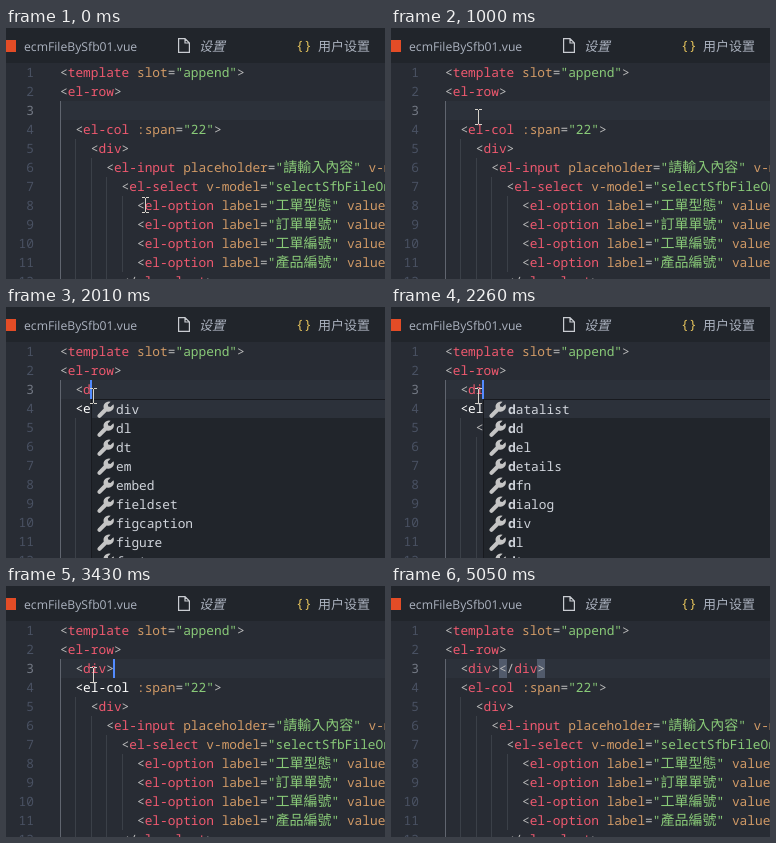
An HTML page that plays this animation: 379x251 px, repeating every 5370 ms.

```html
<!DOCTYPE html>
<html lang="zh-Hant">
<head>
<meta charset="utf-8">
<title>Tag completion in a code editor</title>
<style>
  html, body { margin: 0; width: 100%; height: 100%; overflow: hidden; background: #282c34; }
  svg { display: block; }
  text { white-space: pre; text-rendering: geometricPrecision; }
  .code { font: 12.83px "Noto Sans Mono", "DejaVu Sans Mono", monospace; }
  .cjk { font: 300 14px "Noto Sans CJK TC", "Noto Sans CJK", sans-serif; }
  .tab { font: 12.2px "Open Sans", "Noto Sans", sans-serif; fill: #abb2bf; }
  .tab.han { font: 13px "Noto Sans CJK SC", "Noto Sans CJK", sans-serif; }
  .tab.italic { font-style: italic; }
  .brace { fill: #e5c35c; }
  .hit { font-weight: 700; }
</style>
</head>
<body>
<svg id="stage" width="379" height="251" viewBox="0 0 379 251">
  <rect width="379" height="251" fill="#282c34"/>
  <rect width="379" height="35" fill="#21252b"/>
  <rect x="-2" y="12" width="12" height="12" fill="#e34c26"/>
  <text class="tab" x="18" y="23">ecmFileBySfb01.vue</text>
  <path d="M172.6 10.6h6.4l4.4 4.4v9.4h-10.8zM179 10.6v4.4h4.4" fill="none" stroke="#c9ccd1" stroke-width="1.2"/>
  <text class="tab han italic" x="193" y="23" lang="zh-Hans">设置</text>
  <text class="code brace" x="290" y="22">{</text>
  <text class="code brace" x="298" y="22">}</text>
  <text class="tab han" x="312" y="23" lang="zh-Hans">用户设置</text>

  <rect x="54" y="73" width="325" height="19" fill="#2c313a"/>
  <g id="page"></g>
  <g id="live"></g>
  <path id="mouse" d="M0 .5h3m1 0h3M3.5 1v14M0 15.5h3m1 0h3" fill="none" stroke="#d7d3cb"/>
</svg>
<script>
const LOOP = 5370, LEFT = 54, TOP = 35, ROW = 19, CH = 7.697, BASE = 14, NUMBER_END = 28;
const COLOR = { plain: '#bbbbbb', tag: '#ef596f', attr: '#d19a66', string: '#89ca78' };
const WRENCH = 'M15.2 3L12.5 5.6 10.4 5.2 10 3.3 12.6.7A5 5 0 0 0 6.3 7L.9 12.4A1.9 1.9 0 0 0 3.6 15.1L9 9.7A5 5 0 0 0 15.2 3Z';

// indent, source; rows 3 and 4 are drawn live
const LINES = [
  [0, '<template slot="append">'],
  [0, '<el-row>'],
  null,
  null,
  [4, '<div>'],
  [6, '<el-input placeholder="請輸入內容" v-model'],
  [8, '<el-select v-model="selectSfbFileOn'],
  ...['工單型態', '訂單單號', '工單編號', '產品編號'].map(s => [10, `<el-option label="${s}" value=`]),
  [8, '</el-select>']
];

const ALL = 'div dl dt em embed fieldset figcaption figure footer'.split(' ');
const WITH_D = 'datalist dd del details dfn dialog div dl dt'.split(' ');
const WITH_DI = 'dialog div datalist details'.split(' ');

const STEPS = [
  [0, { src: '', caret: 0, list: [], hit: '', match: [], broken: 0 }],
  [550, { caret: 1 }],
  [1000, { caret: 0 }],
  [1550, { src: '<', caret: 1 }],
  [1630, { match: [0] }],
  [1710, { list: ALL }],
  [2010, { src: '<d', match: [], broken: 1 }],
  [2090, { list: WITH_D, hit: 'd' }],
  [2260, { src: '<di' }],
  [2320, { list: WITH_DI, hit: 'di' }],
  [2550, { src: '<div', list: ['div'], hit: 'div' }],
  [3030, { caret: 0 }],
  [3430, { src: '<div>', caret: 1, list: [] }],
  [3510, { src: '<div></div>', broken: 0 }],
  [3580, { match: [5, 10] }],
  [4030, { caret: 0 }],
  [4510, { caret: 1 }],
  [5050, { caret: 0 }]
];

// time, centre x, centre y of the pointer
const POINTER = [
  [0, 139, 177], [70, 132, 168], [150, 112, 143], [230, 88, 116], [310, 70, 98],
  [390, 65, 90], [470, 76, 88], [550, 87, 89],
  [4350, 93, 94], [4430, 125, 116], [4510, 182, 163], [4590, 236, 207], [4670, 270, 235],
  [4730, 400, 300]
];

const $ = id => document.getElementById(id);
const page = $('page'), live = $('live'), mouse = $('mouse');

function add(parent, name, attrs, text) {
  const node = document.createElementNS('http://www.w3.org/2000/svg', name);
  for (const key in attrs) node.setAttribute(key, attrs[key]);
  if (text) node.textContent = text;
  return parent.appendChild(node);
}

const box = (parent, x, y, width, height, fill) => add(parent, 'rect', { x, y, width, height, fill });
const isHan = c => c > '\u2e80';
const widthOf = s => [...s].reduce((w, c) => w + (isHan(c) ? 14 : CH), 0);
const rowTop = n => TOP + ROW * (n - 1);

function write(parent, x, y, text, fill) {
  for (const run of text.match(/[\u2e80-\uffff]+|[^\u2e80-\uffff]+/g) || []) {
    add(parent, 'text', { x, y, fill, class: isHan(run[0]) ? 'cjk' : 'code' }, run);
    x += widthOf(run);
  }
}

function drawLine(parent, n, indent, src, broken) {
  const x = LEFT + indent * CH, y = rowTop(n) + BASE;
  for (const m of src.matchAll(/(<\/?)([\w-]*)|"[^"]*"?|[:\w-]+|[=>]/g)) {
    const at = x + widthOf(src.slice(0, m.index)), part = m[0];
    if (m[1]) {
      write(parent, at, y, m[1], broken ? '#fff' : COLOR.plain);
      write(parent, at + widthOf(m[1]), y, m[2], broken ? '#fff' : COLOR.tag);
    } else {
      const kind = part[0] === '"' ? 'string' : /[=>]/.test(part) ? 'plain' : 'attr';
      write(parent, at, y, part, COLOR[kind]);
    }
  }
}

// the outermost guide encloses the caret and is lit
function drawGuides(n, indent) {
  for (let c = 0; c < indent; c += 2)
    box(page, Math.round(LEFT + c * CH), rowTop(n), 1, ROW, c ? '#3b4048' : '#60656f');
}

function drawPopup(left, list, hit) {
  const top = rowTop(4), height = ROW * list.length;
  box(live, left, top, 400, height, '#21252b');
  box(live, left, top, 400, ROW, '#2c313a');
  list.forEach((word, i) => {
    const y = top + 1 + i * ROW;
    add(live, 'path', { d: WRENCH, fill: '#c5c5c5', transform: `translate(${left + 6} ${y + 1}) scale(1.08)` });
    const label = add(live, 'text', { x: left + 25, y: y + BASE, class: 'code', fill: '#d0d4db' });
    let k = 0;
    for (const c of word) {
      const found = c === hit[k];
      if (found) k++;
      add(label, 'tspan', found ? { class: 'hit' } : {}, c);
    }
  });
  add(live, 'rect', { x: left + .5, y: top + .5, width: 400, height: height - 1, fill: 'none', stroke: '#181a1f' });
}

function drawLive(s) {
  live.replaceChildren();
  const caretX = Math.round(LEFT - 1 + CH * (2 + Math.min(s.src.length, 5)));
  for (const c of s.match) box(live, Math.round(LEFT + CH * (2 + c)), 73, 8, ROW, '#515a6b');
  drawLine(live, 3, 2, s.src);
  drawLine(live, 4, 2, '<el-col :span="22">', s.broken);
  if (s.caret) box(live, caretX, 73, 2, ROW, '#528bff');
  if (s.list.length) drawPopup(caretX + 1, s.list, s.hit);
}

LINES.forEach((line, i) => {
  const n = i + 1, label = String(n);
  write(page, NUMBER_END - widthOf(label), rowTop(n) + BASE, label, n === 3 ? '#737984' : '#495162');
  drawGuides(n, line ? line[0] : 2);
  if (line) drawLine(page, n, ...line);
});

const lastIndex = (track, t) => track.findLastIndex(k => k[0] <= t);
const start = performance.now();
let shown = -1;

function frame() {
  const t = (performance.now() - start) % LOOP;
  const i = lastIndex(STEPS, t);
  if (i !== shown) {
    drawLive(Object.assign({}, ...STEPS.slice(0, i + 1).map(k => k[1])));
    shown = i;
  }
  const [, x, y] = POINTER[lastIndex(POINTER, t)];
  mouse.setAttribute('transform', `translate(${x - 3} ${y - 8})`);
  requestAnimationFrame(frame);
}
frame();
</script>
</body>
</html>
```
